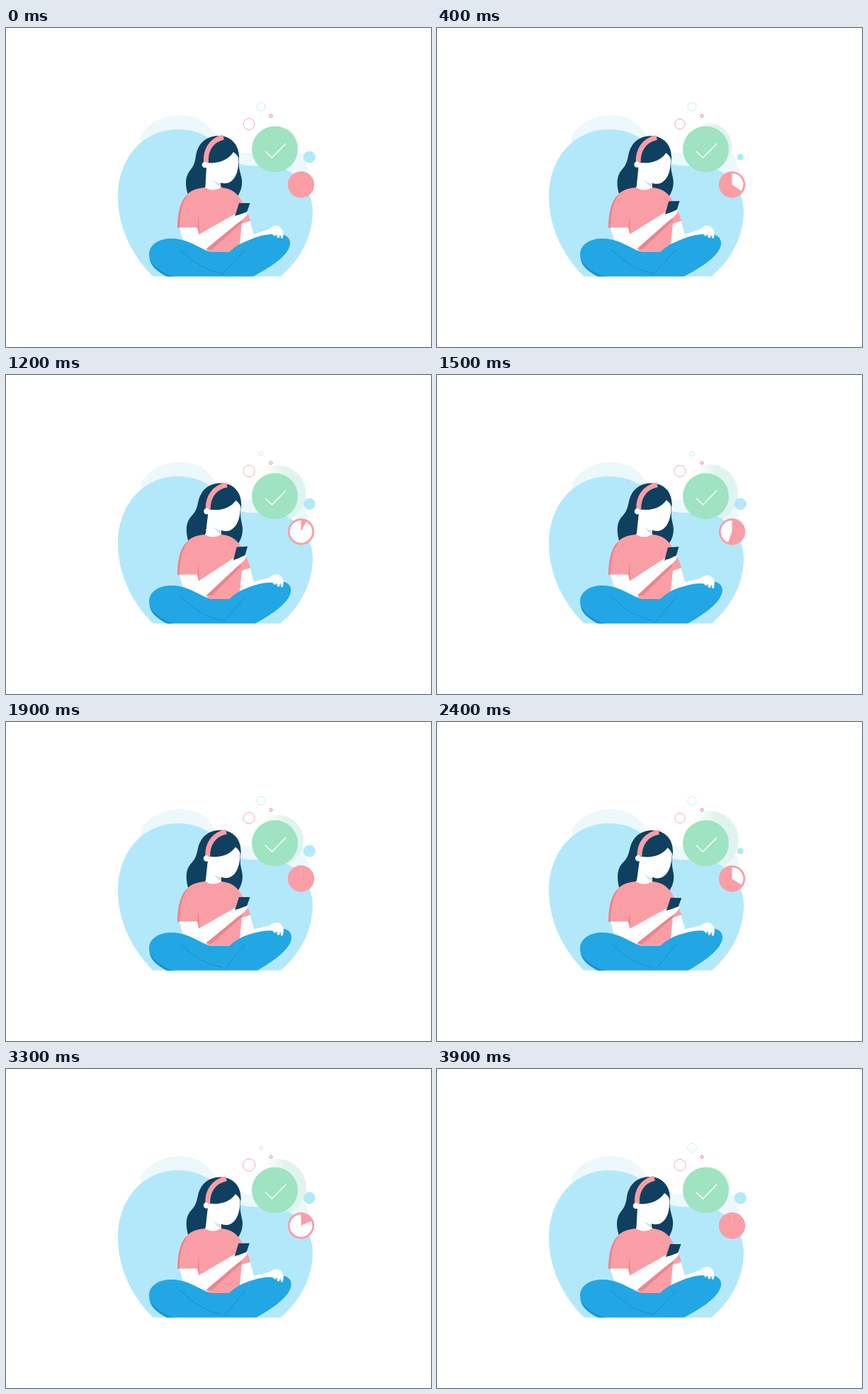
Recreate the animation shown at these times as an HTML page. Size 600x450 px, loop 4 s.

```html
<!DOCTYPE html>
<html lang="en">
<head>
<meta charset="utf-8">
<title>Girl with phone</title>
<style>
  html, body { margin: 0; width: 100%; height: 100%; overflow: hidden; background: #fff; }
  svg { display: block; }
  .pink { fill: #fa9ea6; }
  .navy { fill: #104060; }
  .white { fill: #fff; }
  .line { fill: none; stroke-width: 1; }
</style>
</head>
<body>
<svg width="600" height="450" viewBox="0 0 600 450">
  <defs>
    <linearGradient id="fade" gradientUnits="userSpaceOnUse" x1="366" x2="394" y1="0" y2="0">
      <stop stop-color="#dff4ee" stop-opacity="0"/>
      <stop offset="1" stop-color="#dff4ee"/>
    </linearGradient>
    <clipPath id="floor"><path d="M0 0H600V350.5H0Z"/></clipPath>
  </defs>

  <g clip-path="url(#floor)">
    <!-- backdrop -->
    <path fill="#ecf8fb" d="M190 152C205 131 224 123 245 123C274 123 290 138 300 160C310 175 325 178 345 176L420 177C421 187 424 195 429 206L340 230H200Z"/>
    <circle id="halo" cx="384" cy="167" fill="url(#fade)"/>
    <path fill="#b3e8fa" d="M208 351C175 318 158 278 158 238C158 182 195 143 242 143C288 143 301 170 322 187C336 197 350 194 372 194C412 196 433 230 433 258C433 298 412 330 387 351Z"/>

    <!-- head -->
    <g id="head">
      <path class="navy" d="M300 152C318 152 329 165 329 182C327 198 332 206 333 214C334 226 330 232 326 240L258 238C252 222 253 210 259 202C270 190 266 180 271 170C276 158 288 152 300 152Z"/>
      <path class="white" d="M284 190C300 192 314 186 321 175Q326 178 328 183C329 200 325 213 315 218C309 220 305 219 303 218L304 232H281L283 196Z"/>
      <path fill="#d8dde2" d="M292 214Q297 219 303 219V224Q296 221 292 214Z"/>
      <path fill="none" stroke="#fa9ea6" stroke-width="7" d="M282.500 190C281 172 290 158 307 154"/>
      <circle class="white" cx="281" cy="193" r="4.300"/>
    </g>

    <!-- torso -->
    <path class="white" d="M281 224H304V232H281Z"/>
    <path class="pink" d="M281 225Q292 232 304 225C318 226 328 233 335 248C340 257 343 265 345 272L333 276L331 304L318 317H287L272 290L270 282H242C242 262 246 246 253 238C259 230 268 226 281 225Z"/>
    <path fill="#ea858e" d="M242 282C242 262 246 246 253 238L258 234C248 246 245 264 245 282ZM270 282L272 264L273 292Z"/>
    <path class="white" d="M245 281.500H270L272 291L285 300L282 318H258Q249 300 245 281.500Z"/>
    <g id="forearm">
      <path fill="#ea858e" d="M282 312L332 271L334 274L290 313Z"/>
      <path class="white" d="M264 296L322 263L338 259Q342 259 339 264Q335 270 326 276L282 312L262 316Z"/>
      <path class="navy" d="M329 247H344.500L338.500 264H326L323 266Z"/>
      <path class="white" d="M322 266L333 262L342 258.500Q341 265 334 270H322Z"/>
    </g>

    <!-- legs and resting arm -->
    <path class="white" d="M333 276L344.500 272.500L350 292L345 305H330Z"/>
    <path id="legs" fill="#22a7e4"/>
    <path fill="#1c92cf" d="M203 326C209 337 222 346 238 351H228C212 343 204 335 203 326Z"/>
    <path id="folds" class="line" stroke="#1b8cc9"/>
    <path id="hand" class="white" d="M332 304L338 295L350 291L371 284Q377 278 384 279Q390 282 391.500 289L391 296L388.500 297L387 291L386 296H383L382 291L379.500 294L376 291Q361 290 332 304Z"/>
  </g>

  <!-- bubbles -->
  <circle cx="379.500" cy="171" r="32.500" fill="#9fe3c2"/>
  <path class="line" style="stroke-width:1.500" stroke="#fff" d="M366 174L375.500 183L395 163"/>
  <circle class="pink" cx="416.500" cy="221" r="18.700"/>
  <path id="pie" class="white"/>
  <circle id="dot" cx="428.300" cy="182" fill="#b3e8fa"/>
  <circle id="ringBlue" class="line" cx="360" cy="111" stroke="#c6edf4"/>
  <circle id="ringPink" class="line" cx="343" cy="135.500" stroke="#f5a9b2"/>
  <circle class="line" cx="374" cy="124" r="2" stroke="#ee7587"/>
</svg>

<script>
const LOOP = 4000, CYCLE = 2000, SWEEP = 950;
const el = id => document.getElementById(id);
const set = (id, name, value) => el(id).setAttribute(name, value);

// Eased value from a flat list: time, value, time, value, ...
function track(t, ...keys) {
  let i = 0;
  while (i < keys.length - 4 && t >= keys[i + 2]) i += 2;
  const [t0, a, t1, b] = keys.slice(i, i + 4);
  const p = Math.min(1, Math.max(0, (t - t0) / (t1 - t0)));
  return a + (b - a) * (1 - Math.cos(Math.PI * p)) / 2;
}

function sweep(t) {
  const p = Math.min(1, t / SWEEP);
  return p < .5 ? (2 * p) ** 2.2 / 2 : 1 - (2 - 2 * p) ** 2.2 / 2;
}

// Sector between two fractions of a turn, clockwise from the top
function sector(from, to, cx = 416.5, cy = 221, r = 15.8) {
  if (to - from < .002) return '';
  to = Math.min(to, from + .9999);
  const point = f => `${cx + r * Math.sin(f * 2 * Math.PI)} ${cy - r * Math.cos(f * 2 * Math.PI)}`;
  return `M${cx} ${cy}L${point(from)}A${r} ${r} 0 ${+(to - from > .5)} 1 ${point(to)}Z`;
}

function draw(t) {
  const c = t % CYCLE;
  set('pie', 'd', c < 1000 ? sector(0, sweep(c)) : sector(sweep(c - 1000), 1));
  set('dot', 'r', track(c, 0, 8.6, 450, 4.4, 700, 4.4, 1300, 8.4, 2000, 8.6));
  set('ringBlue', 'r', track(c, 0, 6, 800, 6.2, 1300, 2.4, 1900, 6.2, 2000, 6));
  set('ringPink', 'r', track(c, 0, 8, 400, 7.2, 800, 3, 1300, 8.7, 1500, 8, 2000, 8));
  set('halo', 'r', track(t, 0, 28, 800, 37, 1500, 41, 1900, 36, 2400, 42, 3300, 40, 3900, 29, 4000, 28));

  const tilt = track(t, 0, 0, 800, 1, 1500, .65, 1900, .65, 2400, 1, 3300, .65, 3900, 0);
  const lift = track(t, 0, 0, 800, 1, 1500, .8, 1900, 0, 2400, -.2, 3300, .2, 3900, 0);
  const k = track(t, 0, 0, 800, 0, 1500, .9, 1900, 1, 2400, 1, 3300, .8, 3900, 0);
  set('head', 'transform', `rotate(${4.6 * tilt} 293 232)`);
  set('forearm', 'transform', `rotate(${-4.2 * lift} 262 298)`);
  set('hand', 'transform', `rotate(${5 * k} 335 297)`);
  set('legs', 'd', `M228 351C212 343 202 333 202 320C202 305 216 297 234 297C255 297 268 308 288 316
    H315C330 302 350 ${294 + k} 372 ${291 + k}C${392 + 2 * k} 288 ${402 + 2 * k} 294 ${401 + 2 * k} 305
    C${399 + 2 * k} 322 ${372 + 4 * k} 338 ${348 + 6 * k} 351Z`);
  set('folds', 'd', `M245 312Q276 342 305 346M${337 + k} 313L${304 + 4 * k} 349`);
}

// The animation advances ten times a second.
function frame() {
  draw(Math.floor(performance.now() % LOOP / 100) * 100);
  requestAnimationFrame(frame);
}
frame();
</script>
</body>
</html>
```
